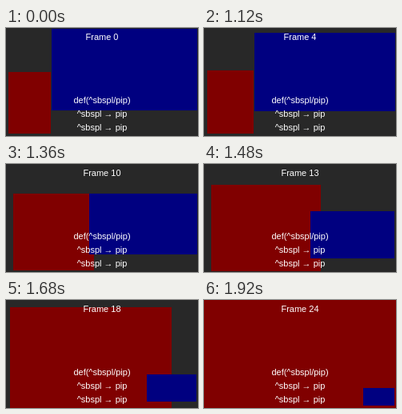
Write an HTML page that moves like this. It is 240 px wide and 135 px high and loops after 2920 ms.

```html
<!DOCTYPE html>
<html lang="en">
<head>
<meta charset="utf-8">
<title>Split to picture-in-picture</title>
<style>
  html, body { margin: 0; width: 100%; height: 100%; overflow: hidden; background: #282828; }
  svg { display: block; width: 100%; height: 100%; }
  rect { shape-rendering: crispEdges; }
  text { font: 11px "Liberation Sans", Arial, sans-serif; fill: #fff; text-anchor: middle; }
</style>
</head>
<body>
<svg viewBox="0 0 240 135">
  <rect id="a" fill="#800000"/>
  <rect id="b" fill="#000080"/>
  <text id="label" x="120" y="15">Frame 0</text>
  <text x="120" y="94">def(^sbspl/pip)</text>
  <text x="120" y="111">^sbspl → pip</text>
  <text x="120" y="128">^sbspl → pip</text>
</svg>
<script>
  const STEP = 40, HOLD = 1000, LAST = 24, LOOP = 2920;
  // Boxes are [left, top, right, bottom]; A is cropped on both sides while split.
  const A = { from: [-39, 55, 98, 132], to: [0, 0, 240, 135], crop: 0.307 };
  const B = { from: [57, 1, 239, 103], to: [199, 110, 238, 132], crop: 0 };
  const byId = id => document.getElementById(id);
  const rectA = byId('a'), rectB = byId('b'), label = byId('label');

  function place(rect, { from, to, crop }, e) {
    const [l, t, r, b] = from.map((v, i) => v + (to[i] - v) * e);
    const cut = crop * (1 - e) * (r - l);
    const [x, y, right, bottom] = [l + cut, t, r - cut, b].map(Math.round);
    rect.setAttribute('x', x);
    rect.setAttribute('y', y);
    rect.setAttribute('width', right - x);
    rect.setAttribute('height', bottom - y);
  }

  let shown = -1;
  function draw(time) {
    const t = time % LOOP;
    const n = t < HOLD ? 0 : Math.min(LAST, 1 + Math.floor((t - HOLD) / STEP));
    if (n !== shown) {
      shown = n;
      const progress = Math.max(0, n - 1) / (LAST - 1);
      const e = (1 - Math.cos(Math.PI * progress)) / 2;
      place(rectA, A, e);
      place(rectB, B, e);
      label.textContent = 'Frame ' + n;
    }
  }

  draw(0);
  let start;
  requestAnimationFrame(function tick(now) {
    start ??= now;
    draw(now - start);
    requestAnimationFrame(tick);
  });
</script>
</body>
</html>
```
